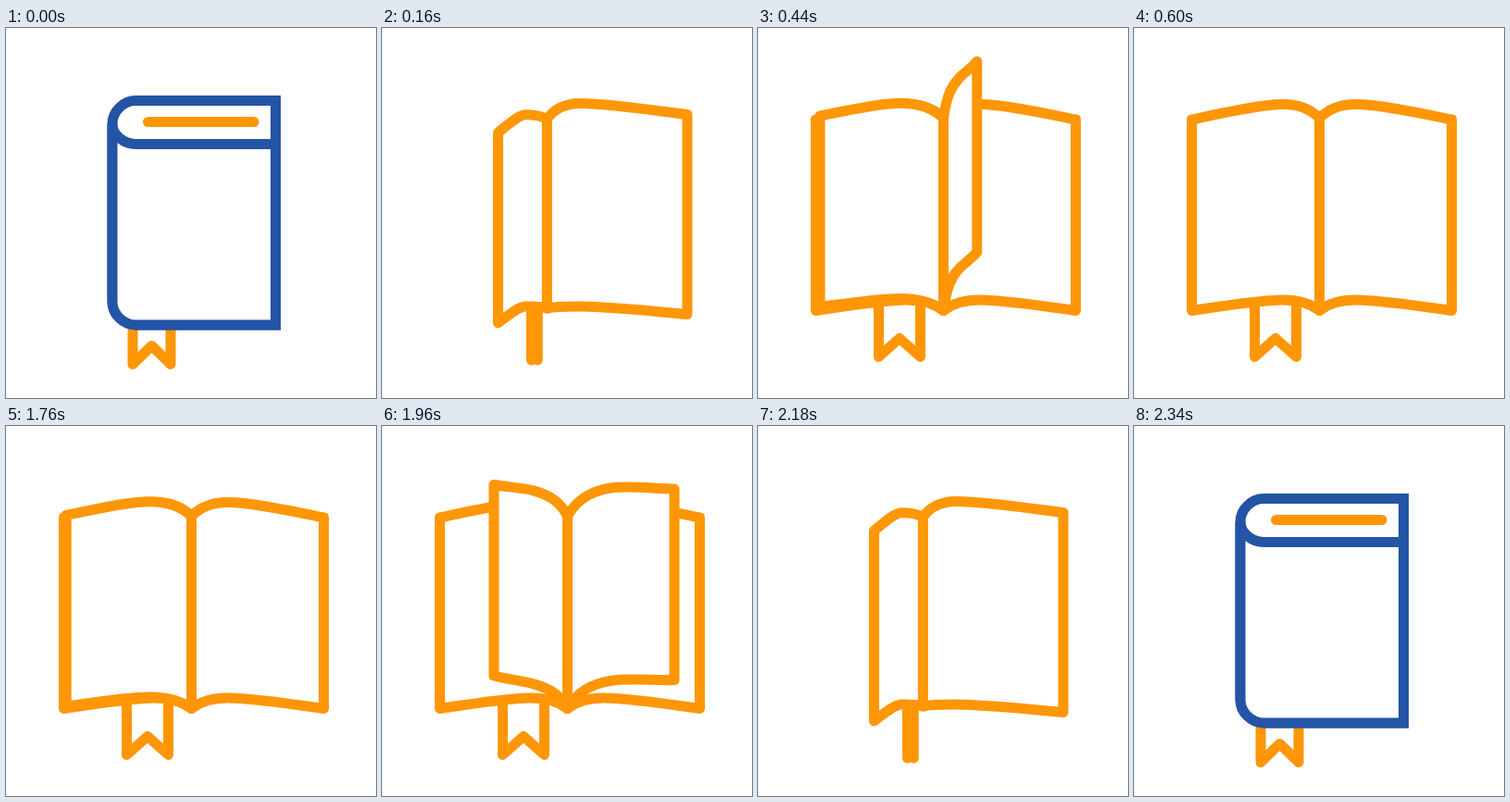
Animation, 400 px wide and 400 px high, one loop 2.37 s. Source, as an HTML page:

```html
<!DOCTYPE html>
<html lang="en">
<head>
<meta charset="utf-8">
<title>Book opening and closing</title>
<style>
  html, body { margin: 0; width: 100%; height: 100%; overflow: hidden; background: #fff; }
  svg { display: block; width: 100vw; height: 100vh; }
  path { fill: #fff; stroke: #ff9606; stroke-width: 11; stroke-linecap: round; stroke-linejoin: round; }
  #ribbon, #title { fill: none; }
  .outside { stroke: #2454a6; stroke-linejoin: miter; }
</style>
</head>
<body>
<svg viewBox="0 0 400 400">
  <path id="ribbon"/>
  <path id="back"/>
  <path id="title"/>
  <path id="cover"/>
  <path class="leaf"/>
  <path class="leaf"/>
  <path class="leaf"/>
</svg>
<script>
const LOOP = 2370, STEP = 20, OPENED = 600, CLOSING = 1760, SHUT = 2340;
const COVER_TIME = 240, EDGE_ON = 130, RIBBON_TIME = 300;
const LEAF_START = 55, LEAF_STAGGER = 135, LEAF_TIME = 272;

const [ribbon, back, title, cover] =
  ['ribbon', 'back', 'title', 'cover'].map(id => document.getElementById(id));
const leaves = [...document.querySelectorAll('.leaf')];

const lerp = (a, b, k) => a + (b - a) * k;
const clamp = u => Math.min(1, Math.max(0, u));
const smooth = u => u * u * (3 - 2 * u);

function mix(a, b, k) {
  return Object.fromEntries(Object.keys(a).map(key => [key, lerp(a[key], b[key], k)]));
}

const SPINE_SHUT = { x: 115, top: 103.5, bottom: 296 };
const SPINE_OPEN = { x: 200.5, top: 97.5, bottom: 305.5 };

// A page has an outer edge, a knee where it bends, and a slope at the knee.
const shutPage = top => ({
  edgeX: 291.5, edgeTop: top, edgeBottom: 321,
  kneeX: 140, kneeTop: top, kneeBottom: 321, slope: 0
});

// A page of the open book, turned from 0 (flat right) to PI (flat left).
function turnedPage(angle) {
  const cos = Math.cos(angle), sin = Math.sin(angle);
  const lift = 62 * sin ** 1.75 * (1 + 0.3 * cos);
  const kneeLift = lift * (0.42 + 0.1 * cos);
  const edgeX = 203 + 140.5 * cos, edgeTop = 99 - lift;
  return {
    edgeX, edgeTop, edgeBottom: 305.5 - lift,
    kneeX: SPINE_OPEN.x + 40 * cos + 15 * Math.sin(2 * angle),
    kneeTop: 82.5 - kneeLift, kneeBottom: 294 - 1.2 * kneeLift,
    slope: 0.65 * (edgeTop - SPINE_OPEN.top) / (edgeX - SPINE_OPEN.x || 1)
  };
}

// Bezier points from the outer edge through the knee to the spine.
function curve(ex, ey, kx, ky, sx, sy, slope, bend) {
  const out = (ex - kx) * 0.25, inn = (sx - kx) * 0.5;
  return [
    [ex, ey],
    [lerp(ex, kx, 0.33), lerp(ey, ky, 0.42)],
    [kx + out, ky + out * slope],
    [kx, ky],
    [kx + inn, ky + inn * slope],
    [lerp(sx, kx, 0.2 * bend), lerp(sy, ky, 0.55)],
    [sx, sy]
  ];
}

function pagePath(page, spine, bend = 1) {
  const side = name => curve(page.edgeX, page['edge' + name], page.kneeX, page['knee' + name],
    spine.x, spine[name.toLowerCase()], page.slope, bend);
  const [start, ...top] = side('Top');
  const [foot, ...bottom] = side('Bottom').reverse();
  return `M${start}C${top.join(' ')}L${foot}C${bottom.join(' ')}Z`;
}

function drawBook(state) {
  const p = smooth(clamp(state / COVER_TIME));
  const outside = state < EDGE_ON;
  const swing = Math.sin(Math.PI * p);
  const spine = mix(SPINE_SHUT, SPINE_OPEN, p);
  const backPage = mix(shutPage(78.5), turnedPage(0), p);
  const coverPage = mix(shutPage(125.5), turnedPage(Math.PI), p);
  coverPage.edgeX += 5 * swing;
  coverPage.edgeTop += 10 * swing;
  coverPage.edgeBottom += 13 * swing;

  back.setAttribute('d', pagePath(backPage, spine, p));
  cover.setAttribute('d', pagePath(coverPage, spine, p));
  back.classList.toggle('outside', outside);
  cover.classList.toggle('outside', outside);

  const titleY = (backPage.edgeTop + coverPage.edgeTop) / 2 - 0.5;
  title.setAttribute('d', outside ? `M${153.5 + 70 * p} ${titleY}H${268 - 10 * p}` : '');
}

// The ribbon turns half round, showing its edge midway.
function drawRibbon(state) {
  const u = smooth(clamp(state / RIBBON_TIME));
  const facing = Math.abs(Math.cos(Math.PI * u));
  const x = lerp(157.5, 153, u) + 10 * Math.sin(Math.PI * u);
  const half = lerp(20.5, 22.5, u) * facing;
  const tip = lerp(363.5, 355.5, u);
  ribbon.setAttribute('d',
    `M${x - half} 300V${tip}L${x} ${tip - 20 * facing}L${x + half} ${tip}V300`);
}

function drawLeaf(leaf, i, state) {
  const u = (state - LEAF_START - i * LEAF_STAGGER) / LEAF_TIME;
  const turning = state >= COVER_TIME && u > 0 && u < 1;
  leaf.setAttribute('d', turning ? pagePath(turnedPage(Math.PI * u), SPINE_OPEN) : '');
}

function frame() {
  const now = performance.now() % LOOP;
  const t = Math.floor((now + 1) / STEP) * STEP;
  // Closing is the opening played backwards.
  const state = t < CLOSING ? Math.min(t, OPENED) : Math.max(0, SHUT - t);
  drawRibbon(state);
  drawBook(state);
  leaves.forEach((leaf, i) => drawLeaf(leaf, i, state));
  requestAnimationFrame(frame);
}
frame();
</script>
</body>
</html>
```
